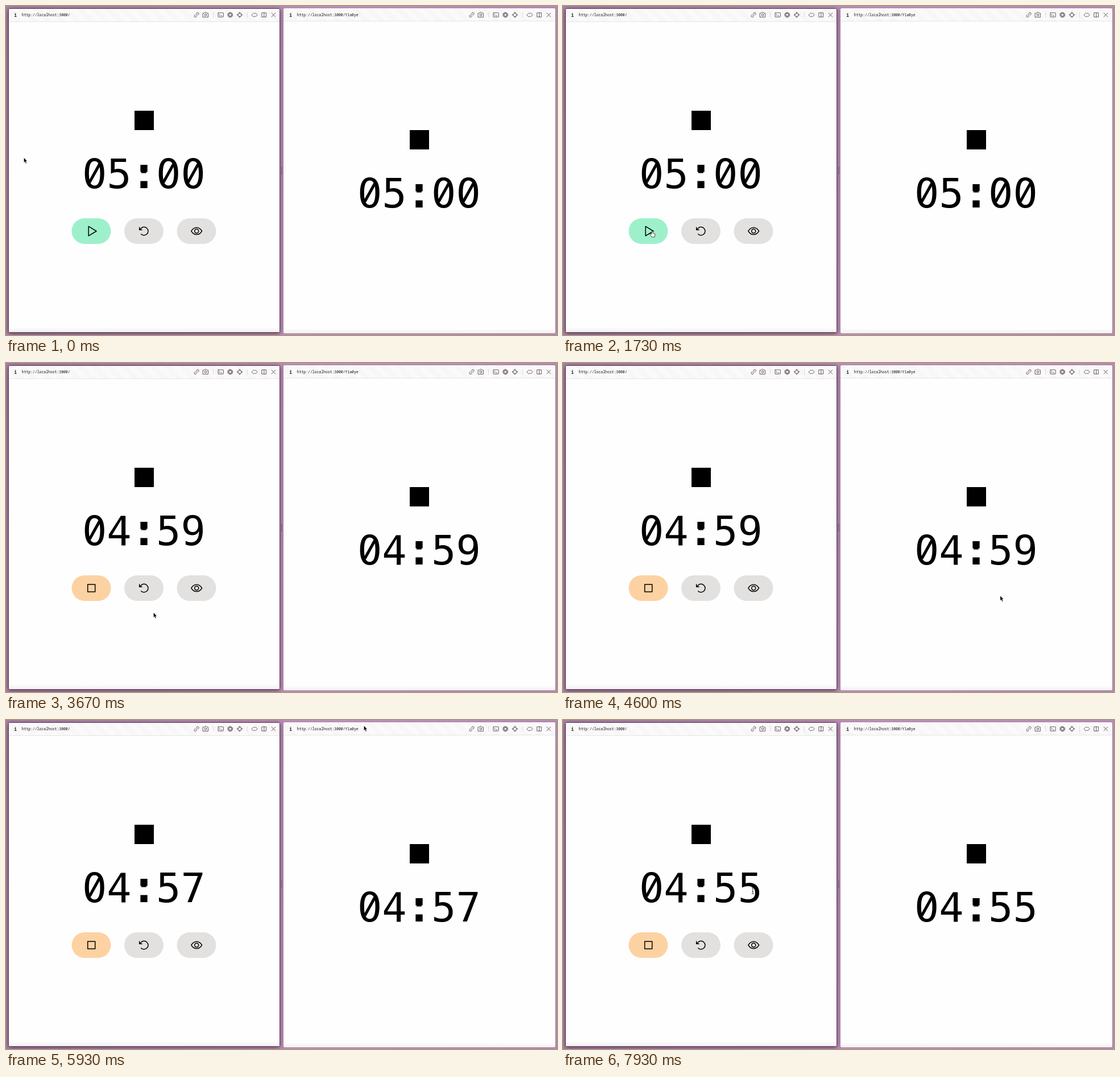
An HTML page for the animation above (8 s loop, 969 px wide and 578 px high).

```html
<!DOCTYPE html>
<html lang="en">
<head>
<meta charset="utf-8">
<title>Shared timer</title>
<style>
  html, body { margin: 0; width: 100%; height: 100%; overflow: hidden; }
  body { position: relative; background: linear-gradient(100deg, #ab83a5, #bd90b7 55%, #b68ab0); }
  .pane { position: absolute; box-sizing: border-box; background: #fefefe; border-radius: 3px; overflow: hidden; }
  .pane::before {
    content: ""; position: absolute; inset: 0 0 auto; height: 22px;
    border-bottom: 1px solid #e6e4e6;
    background: repeating-linear-gradient(45deg, #fbfafb 0 9px, #f8f7f8 9px 18px);
  }
  .pane::after {
    content: ""; position: absolute; inset: auto 0 0; height: 9px;
    background: linear-gradient(#fefefe, #f1f0f1);
  }
  .left { left: 4px; top: 4px; width: 478px; height: 570px; border: 1px solid #5b3e57; box-shadow: 0 2px 8px rgba(45, 15, 45, .6); }
  .right { left: 488px; top: 4px; width: 478px; height: 570.5px; box-shadow: 0 0 2px rgba(60, 30, 60, .25); }
  svg { position: absolute; left: 0; top: 0; }
  .tool { fill: none; stroke: #584653; stroke-width: .9; stroke-linecap: round; stroke-linejoin: round; }
  .icon { fill: none; stroke: #000; stroke-width: 1.5; stroke-linecap: round; stroke-linejoin: round; }
  .url { font: 500 6.43px "Noto Sans Mono", monospace; fill: #111; }
  .info { font: 700 8px "Noto Sans Mono", monospace; fill: #222; }
  .time { font: 72px "DejaVu Sans Mono", monospace; }
</style>
</head>
<body>
<div class="pane left"></div>
<div class="pane right"></div>
<svg width="969" height="578" viewBox="0 0 969 578">
  <defs>
    <g id="bar" class="tool" transform="translate(0 15.6)">
      <path d="M-1-2H-3a2 2 0 0 0 0 4H-1M1-2H3a2 2 0 0 1 0 4H1M-2 0H2" transform="translate(335) rotate(-45)"/>
      <g transform="translate(351)">
        <path d="M-4.500-3H-2.500L-1.500-4.500H1.500L2.500-3H4.500V4H-4.500Z"/><circle r="1.800"/>
      </g>
      <path d="M364.500-4.500v9M424.500-4.500v9" stroke="#dad6d9"/>
      <g transform="translate(377.700)">
        <rect x="-4.700" y="-3.700" width="9.400" height="7.400" rx=".6"/><path d="M-3-1.500L-1.500 0L-3 1.500M0 1.500H2"/>
      </g>
      <g transform="translate(394.200)"><circle r="4.300"/><g id="blades" stroke-width=".7"></g></g>
      <g transform="translate(411)"><circle r="3.500"/><path d="M0-5v3M0 2v3M-5 0h3M2 0h3"/></g>
      <path d="M-5 0l3.500-3.500L0-2l1.500-1.500L5 0L1.500 3.500L0 2l-1.500 1.500Z" transform="translate(437.200)"/>
      <path d="M-3.700-3.700H3.700V3.700H-3.700ZM0-3.700V3.700" transform="translate(453.900)"/>
      <path d="M-3.400-3.400L3.400 3.400M3.400-3.400L-3.400 3.400" transform="translate(470.400)"/>
    </g>
    <g id="slash">
      <ellipse cx="21.700" cy="-26.200" rx="7.500" ry="13" fill="#fefefe"/>
      <path d="M13-10.500L30.500-42" stroke="#000" stroke-width="5"/>
    </g>
    <path id="colon" d="M15.700 0V-12.500H28V0ZM15.700-28.500V-41H28V-28.500Z"/>
    <rect id="pill" x="-34.500" width="69" height="45" rx="22.500" y="373"/>
    <path id="arrow" d="M.5 1V25L6 20 10 30.500 13.500 29 9.300 19H16.500Z"
      fill="#000" stroke="#fff" stroke-width="2.500" paint-order="stroke" stroke-linejoin="round"/>
    <path id="hand" d="M-1 0Q0-2 1 0V3L4 4Q5 4 5 5L4 10H-1L-4 5Q-4 3-1 5Z"
      fill="#fff" stroke="#222" stroke-width=".8" stroke-linejoin="round"/>
    <path id="beam" d="M-2-5.500Q0-5.500 0-4.500Q0-5.500 2-5.500M0-4.500V4.500M-2 5.500Q0 5.500 0 4.500Q0 5.500 2 5.500M-1 1.500H1"
      fill="none" stroke="#222" stroke-width=".9"/>
  </defs>

  <use href="#bar"/>
  <use href="#bar" x="484"/>
  <text class="info" x="14.300" y="18.500">i</text>
  <text class="info" x="498.300" y="18.500">i</text>
  <text class="url" x="27.800" y="17.700">http://localhost:3000/</text>
  <text class="url" x="511.800" y="17.700">http://localhost:3000/Y1a0ye</text>
  <path d="M484.800 282v14" stroke="#6d4f69"/>

  <rect x="226" y="184" width="34" height="34"/>
  <rect x="710" y="218" width="34" height="34"/>
  <g id="near" transform="translate(134 320)"></g>
  <g id="far" transform="translate(618 354)"></g>

  <use href="#pill" id="toggle" x="150"/>
  <use href="#pill" x="242.500" fill="#e2e1df"/>
  <use href="#pill" x="335" fill="#e2e1df"/>
  <g class="icon">
    <path id="play" d="M145.200 387.200V403.800L159 395.500Z"/>
    <rect id="stop" x="143.700" y="389" width="13" height="13"/>
    <path d="M234.700 389V393.300H239M235.300 392.800L237.600 390.500A7.200 7.200 0 1 1 237.700 400.700"/>
    <path d="M325.800 395.400Q329.500 389.200 335.200 389.200T344.600 395.400Q341 401.600 335.200 401.600T325.800 395.400Z"/>
    <circle cx="335.200" cy="395.400" r="3.500"/>
  </g>

  <circle id="press" r="12" fill="#ff3b30" opacity=".94"/>
  <use id="cursor"/>
</svg>
<script>
  const LOOP = 8000, FPS = 15, ADVANCE = 43.34;
  const START = 2660, SHAKE = { from: 4467, to: 5200 };
  const $ = id => document.getElementById(id);
  const clamp = v => Math.max(0, Math.min(1, v));
  const ease = k => k * k * (3 - 2 * k);
  const between = (t, a, b) => t >= a && t < b;

  const home = { x: 31.5, y: 266.5 };
  const moves = [
    { from: 66, to: 267, x: 397, y: 258.5 },
    { from: 466, to: 600, x: 388, y: 252.5 },
    { from: 1130, to: 1733, x: 157, y: 396 },
    { from: 2733, to: 3267, x: 259.5, y: 438.5 },
    { from: 3867, to: 4333, x: 819, y: 417.5, sag: 28 },
    { ...SHAKE, x: 864, y: 317.5 },
    { from: 5200, to: 5933, x: 629.5, y: 10 },
    { from: 6200, to: 6333, x: 629.5, y: 12 },
    { from: 6533, to: 7267, x: 343.5, y: 296.5 },
    { from: 7800, to: 7933, x: 333.8, y: 300 }
  ];

  function pointerAt(t) {
    let { x, y } = home;
    for (const m of moves) {
      const k = ease(clamp((t - m.from) / (m.to - m.from)));
      x += (m.x - x) * k;
      y += (m.y - y) * k + (m.sag || 0) * Math.sin(Math.PI * k);
    }
    const swing = Math.sin(3 * Math.PI * clamp((t - SHAKE.from) / (SHAKE.to - SHAKE.from)));
    return [x - 55 * swing ** 2, y];
  }

  function setTime(group, t) {
    const left = 300 - Math.max(0, Math.floor((t - START) / 1000));
    const pad = n => String(n).padStart(2, "0");
    const label = pad(Math.floor(left / 60)) + ":" + pad(left % 60);
    if (group.dataset.label === label) return;
    group.dataset.label = label;
    const overlay = { "0": "slash", ":": "colon" };
    group.innerHTML = `<text class="time">${label}</text>` + [...label].map((c, i) =>
      overlay[c] ? `<use href="#${overlay[c]}" x="${i * ADVANCE}"/>` : "").join("");
  }

  function cursorShape(x, y) {
    const overButton = between(y, 373, 418) && between(x, 116, 370) && (x - 116) % 92.5 < 69;
    if (overButton) return "hand";
    return between(x, 134, 351) && between(y, 262, 326) ? "beam" : "arrow";
  }

  function draw(t) {
    const [x, y] = pointerAt(t), running = t >= START;
    setTime($("near"), t);
    setTime($("far"), t);
    $("toggle").setAttribute("fill", running ? "#fdd2a2" : "#9ef0cb");
    $("play").style.display = running ? "none" : "";
    $("stop").style.display = running ? "" : "none";

    const pressed = between(t, 995, 1195) || between(t, 2530, 2730);
    $("press").style.display = pressed ? "" : "none";
    $("press").setAttribute("transform", `translate(${x} ${y})`);

    // Shaking the pointer enlarges it for a moment
    const grow = clamp(Math.min((t - 4930) / 200, (5333 - t) / 130));
    const shape = cursorShape(x, y);
    const scale = shape === "arrow" ? .33 + .67 * grow : 1;
    $("cursor").setAttribute("href", "#" + shape);
    $("cursor").setAttribute("transform", `translate(${x} ${y}) scale(${scale})`);
    $("cursor").style.filter = grow ? "drop-shadow(0 2px 2px rgba(0,0,0,.35))" : "";
  }

  $("blades").innerHTML = Array.from({ length: 6 }, (_, i) =>
    `<path d="M0-4.300L3 1" transform="rotate(${i * 60})"/>`).join("");

  const origin = performance.now();
  function loop() {
    const t = Math.max(0, performance.now() - origin) % LOOP;
    draw(Math.floor((t + 4) * FPS / 1000) * 1000 / FPS);
    requestAnimationFrame(loop);
  }
  loop();
</script>
</body>
</html>
```
